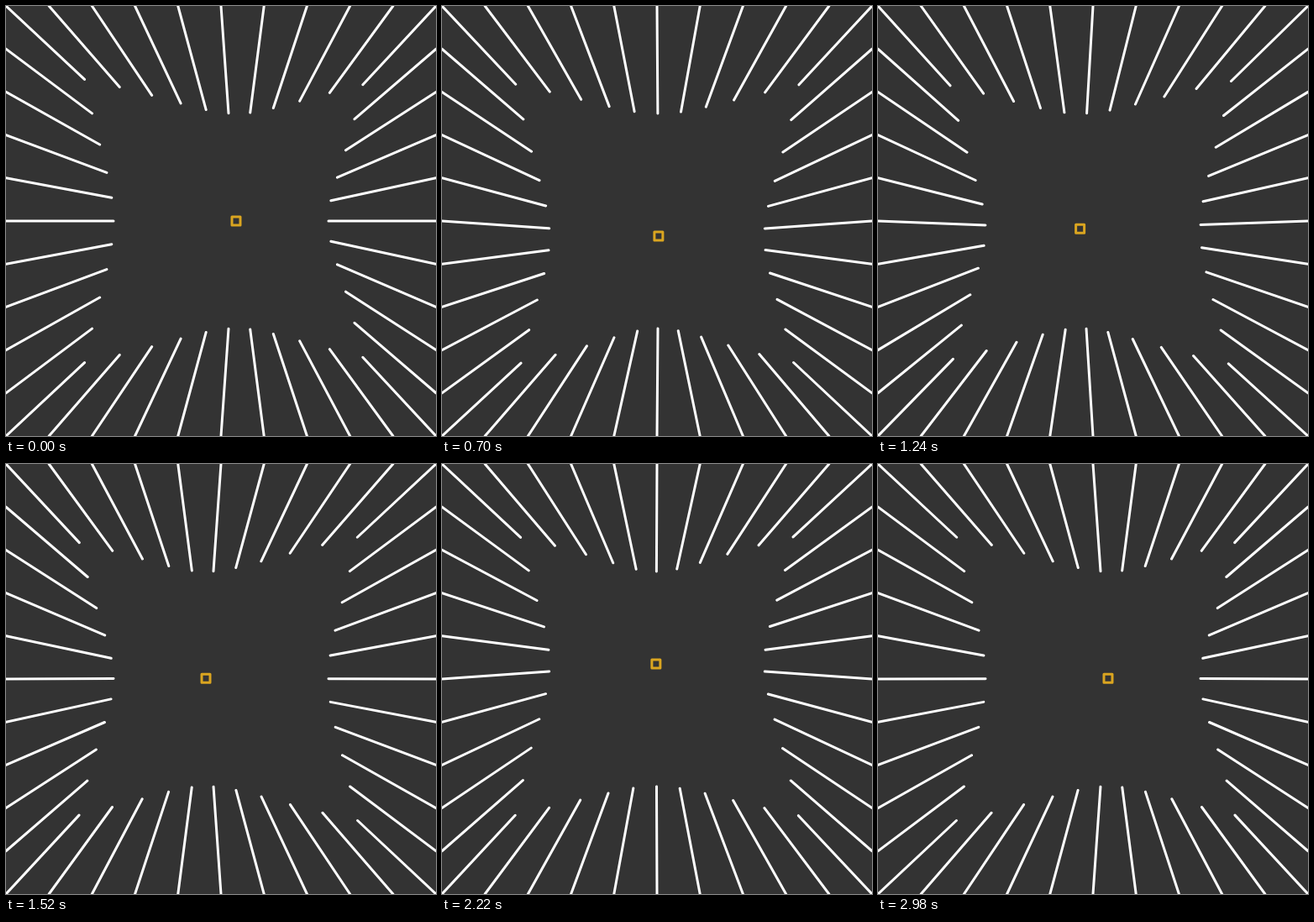
An HTML page with a canvas that plays this animation: 512 px wide and 512 px high, repeating every 3 s.

```html
<!DOCTYPE html>
<html>
<head>
<meta charset="utf-8">
<style>
html, body { margin: 0; height: 100%; overflow: hidden; background: #333; }
canvas { display: block; }
</style>
</head>
<body>
<canvas width="512" height="512"></canvas>
<script>
const ctx = document.querySelector('canvas').getContext('2d');
const size = 512, mid = size / 2, step = size / 10;
const rayLength = 128, orbit = 18, period = 3000, tick = 20;

// A ray starts on the border and points at the moving square.
function ray(x, y, tx, ty) {
  const k = rayLength / Math.hypot(tx - x, ty - y);
  ctx.moveTo(x, y);
  ctx.lineTo(x + (tx - x) * k, y + (ty - y) * k);
}

function draw(now) {
  const t = Math.floor((now % period) / tick) * tick;
  const angle = t / period * 2 * Math.PI;
  const tx = mid + orbit * Math.cos(angle);
  const ty = mid + orbit * Math.sin(angle);

  ctx.fillStyle = '#333';
  ctx.fillRect(0, 0, size, size);
  ctx.lineWidth = 3;
  ctx.lineCap = ctx.lineJoin = 'round';

  ctx.strokeStyle = '#fff';
  ctx.beginPath();
  for (let i = 0; i < 10; i++) {
    const d = i * step;
    ray(d, 0, tx, ty);
    ray(size, d, tx, ty);
    ray(size - d, size, tx, ty);
    ray(0, size - d, tx, ty);
  }
  ctx.stroke();

  ctx.strokeStyle = 'goldenrod';
  ctx.strokeRect(tx - 5, ty - 5, 10, 10);
  requestAnimationFrame(draw);
}
requestAnimationFrame(draw);
</script>
</body>
</html>
```
